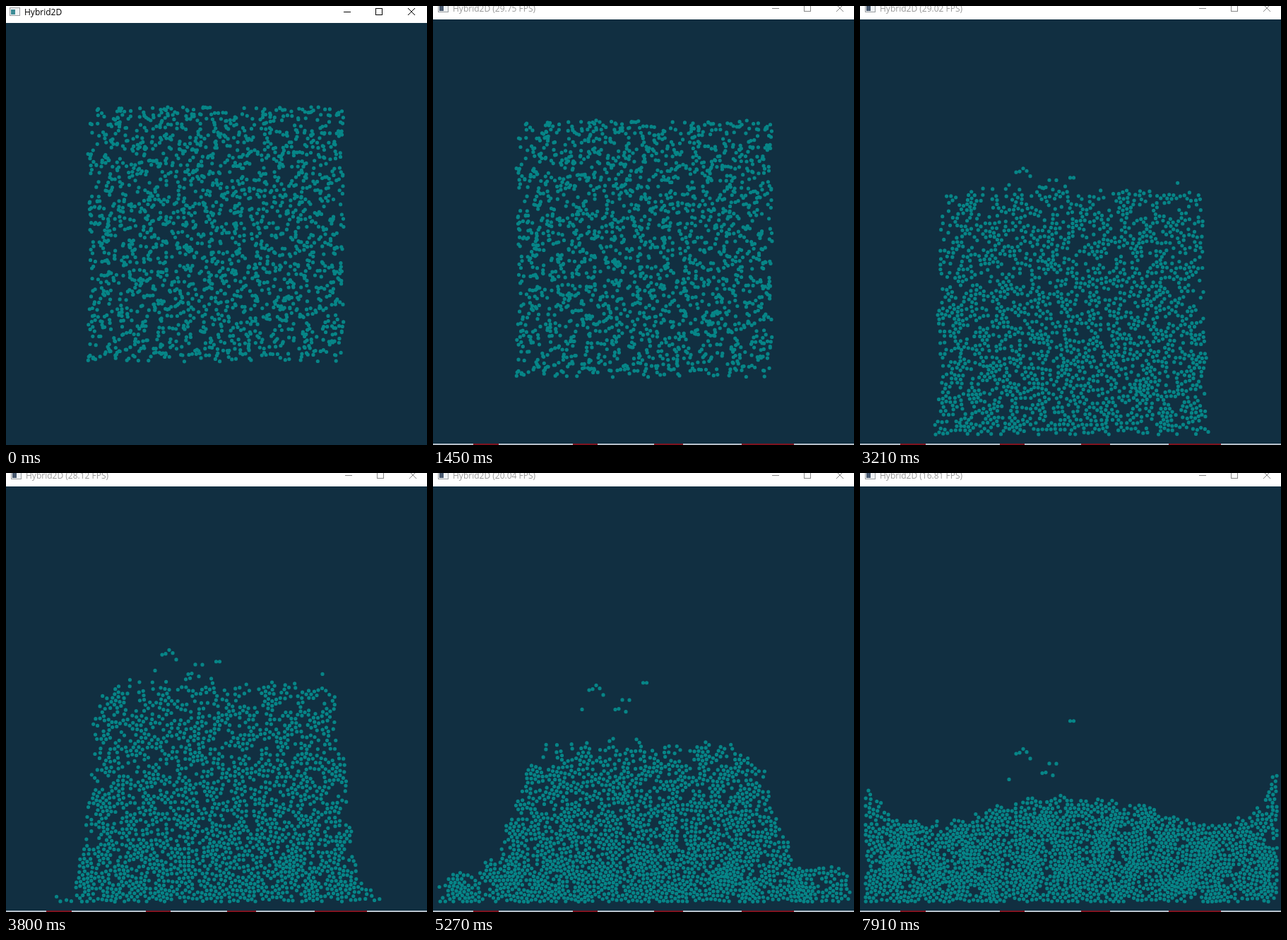
An HTML page with a canvas for the animation above (8 s loop, 596 px wide and 621 px high).

```html
<!DOCTYPE html>
<html lang="en">
<head>
<meta charset="utf-8">
<title>Hybrid2D</title>
<style>
html, body { margin: 0; width: 100%; height: 100%; overflow: hidden; background: #112f41; }
canvas { display: block; }
</style>
</head>
<body>
<canvas id="stage" width="596" height="621"></canvas>
<script>
const ctx = document.getElementById('stage').getContext('2d');
const LOOP = 8000, STEP = 293.6;
const COUNT = 2000, RADIUS = 2.6, GAP = 6.2;
const FLOOR = 606, MID = 299, WALL = 291, STRIPS = 120;

const clamp = (v, lo, hi) => Math.max(lo, Math.min(hi, v));
const blend = (a, b, f) => a + (b - a) * f;

// Piecewise linear value at step n
function track(keys, values, n) {
  let i = 0;
  while (i < keys.length - 2 && n > keys[i + 1]) i++;
  return blend(values[i], values[i + 1], clamp((n - keys[i]) / (keys[i + 1] - keys[i]), 0, 1));
}

let seed = 7;
function random() {
  seed = (seed + 0x6d2b79f5) | 0;
  let t = Math.imul(seed ^ (seed >>> 15), 1 | seed);
  t = (t + Math.imul(t ^ (t >>> 7), 61 | t)) ^ t;
  return ((t ^ (t >>> 14)) >>> 0) / 4294967296;
}

// Even spread with enough jitter to look random
const grains = Array.from({ length: COUNT }, (_, i) =>
  [0.7549, 0.5698].map(g => (i * g + random() * 0.08) % 1));

const blockTop = n => 138 + 0.95 * n * n;
const blockBase = n => Math.min(FLOOR, 498 + 1.08 * n * n);

// Water height at distance d from the middle: a slumping block, a spreading toe, a splash at the walls
function surface(n) {
  const key = values => track([10, 13, 18, 22, 27], values, n);
  const block = n < 10 ? blockBase(n) - blockTop(n) : key([373, 305, 185, 75, 45]);
  const width = key([190, 183, 185, 175, 130]);
  const steep = key([200, 30, 12, 10, 4]);
  const toe = key([0, 18, 50, 88, 105]);
  const reach = key([181, 234, 300, 330, 330]);
  const splash = key([0, 0, 0, 35, 85]);
  const height = d => block / (1 + (d / width) ** steep)
    + toe * (1 - (d / reach) ** 30)
    + splash * Math.exp((d - WALL) / 25);
  return { height, half: Math.min(reach, WALL) };
}

// Spread the grains under the surface, denser towards the floor
function fill(n) {
  const { height, half } = surface(n);
  const base = blockBase(n), strip = 2 * half / STRIPS;
  const sink = track([8, 13, 18, 22, 27], [0, 0.38, 0.38, 0.25, 0.12], n);
  const rough = track([3, 8, 13, 18, 27], [0, 6, 34, 34, 12], n);
  const sums = [0];
  for (let i = 0; i < STRIPS; i++) sums.push(sums[i] + height(Math.abs((i + 0.5) * strip - half)));
  return grains.map(([u, v]) => {
    const mass = u * sums[STRIPS];
    const i = sums.findIndex(s => s > mass) - 1;
    const x = (i + (mass - sums[i]) / (sums[i + 1] - sums[i])) * strip - half;
    const h = height(Math.abs(x));
    const wave = 0.5 + 0.25 * (Math.sin(u * 61) + Math.sin(u * 137 + 1));
    const dip = rough * wave * v ** 3 * Math.min(1, h / 100);
    return [MID + x, base - Math.max(0, h * (v + sink * v * (v - 1)) - dip)];
  });
}

// Push close neighbours apart
function relax(points, force) {
  const keyOf = ([x, y]) => Math.floor(x / GAP) + Math.floor(y / GAP) * 200;
  for (let pass = 0; pass < 7; pass++) {
    const cells = new Map();
    for (const p of points) {
      const key = keyOf(p);
      if (cells.has(key)) cells.get(key).push(p); else cells.set(key, [p]);
    }
    for (const p of points) {
      const key = keyOf(p);
      for (let k = 0; k < 9; k++) {
        for (const q of cells.get(key + k % 3 - 1 + (Math.floor(k / 3) - 1) * 200) || []) {
          const dx = p[0] - q[0], dy = p[1] - q[1], d = Math.hypot(dx, dy);
          if (q === p || d >= GAP || d === 0) continue;
          const push = force * 0.25 * (GAP - d) / d;
          p[0] += dx * push; p[1] += dy * push;
          q[0] -= dx * push; q[1] -= dy * push;
        }
      }
      p[0] = clamp(p[0], MID - WALL, MID + WALL);
      p[1] = Math.min(p[1], FLOOR);
    }
  }
}

// Clumps of drops that sink slowly above the rest
const drops = [
  { x: 231, y: 258, speed: 10, size: 5 },
  { x: 300, y: 267, speed: 6, size: 2 },
  { x: 211, y: 279, speed: 11, size: 1 },
  { x: 268, y: 278, speed: 10, size: 5 }
].flatMap(({ x, y, speed, size }) => Array.from({ length: size }, (_, i) => ({
  x: x + (i - (size - 1) / 2) * 5, y: y + (random() - 0.5) * 4 * size, speed
})));

const dropPoints = n => drops.map(({ x, y, speed }) => {
  const start = blockTop(Math.min(n, 8)) + (y - 250) / 2;
  return [x, track([8, 13], [start, y], n) + speed * Math.max(0, n - 13)];
});

function drawTitle(n) {
  const active = n === 0;
  ctx.fillStyle = '#fff';
  ctx.fillRect(0, 0, 596, active ? 24 : 19);
  ctx.save();
  if (!active) ctx.translate(2, -5);
  ctx.strokeStyle = '#9a9da0';
  ctx.lineWidth = 1;
  ctx.fillStyle = '#eef1f3';
  ctx.fillRect(5, 2, 15, 12);
  ctx.strokeRect(5.5, 2.5, 14, 11);
  ctx.fillStyle = active ? '#3c8c96' : '#4a5a70';
  ctx.fillRect(7, 5, 6, 7);

  const fps = track([5, 8, 13, 18, 22, 27], [29.75, 30.38, 28.12, 20.04, 17.78, 16.81], n);
  ctx.fillStyle = active ? '#000' : '#999';
  ctx.font = '12px "Open Sans", "Noto Sans", sans-serif';
  ctx.fillText(active ? 'Hybrid2D' : `Hybrid2D (${fps.toFixed(2)} FPS)`, 26, 13);

  ctx.strokeStyle = active ? '#000' : '#888';
  ctx.strokeRect(523.5, 3.5, 9, 9);
  ctx.beginPath();
  ctx.moveTo(478, 8.5); ctx.lineTo(488, 8.5);
  ctx.moveTo(569, 3); ctx.lineTo(579, 13);
  ctx.moveTo(579, 3); ctx.lineTo(569, 13);
  ctx.stroke();
  ctx.restore();
}

function drawEdge() {
  ctx.fillStyle = '#b4bec8';
  ctx.fillRect(0, 619, 596, 2);
  ctx.fillStyle = '#7d1420';
  for (const [x, w] of [[57, 36], [198, 35], [313, 41], [437, 74]]) ctx.fillRect(x, 619, w, 2);
}

function draw(n) {
  ctx.fillStyle = '#112f41';
  ctx.fillRect(0, 0, 596, 621);
  drawTitle(n);
  if (n > 0) drawEdge();

  const points = fill(n);
  const force = track([8, 13], [0, 1], n);
  if (force > 0) relax(points, force);
  ctx.save();
  if (n === 0) ctx.translate(-2, 5);
  ctx.fillStyle = '#068587';
  ctx.beginPath();
  for (const [x, y] of [...points, ...dropPoints(n)]) {
    ctx.moveTo(x + RADIUS, y);
    ctx.arc(x, y, RADIUS, 0, 7);
  }
  ctx.fill();
  ctx.restore();
}

let shown = -1;
const begin = performance.now();
function tick() {
  const n = Math.floor(((performance.now() - begin) % LOOP + 27) / STEP);
  if (n !== shown) draw(shown = n);
  requestAnimationFrame(tick);
}
tick();
</script>
</body>
</html>
```
